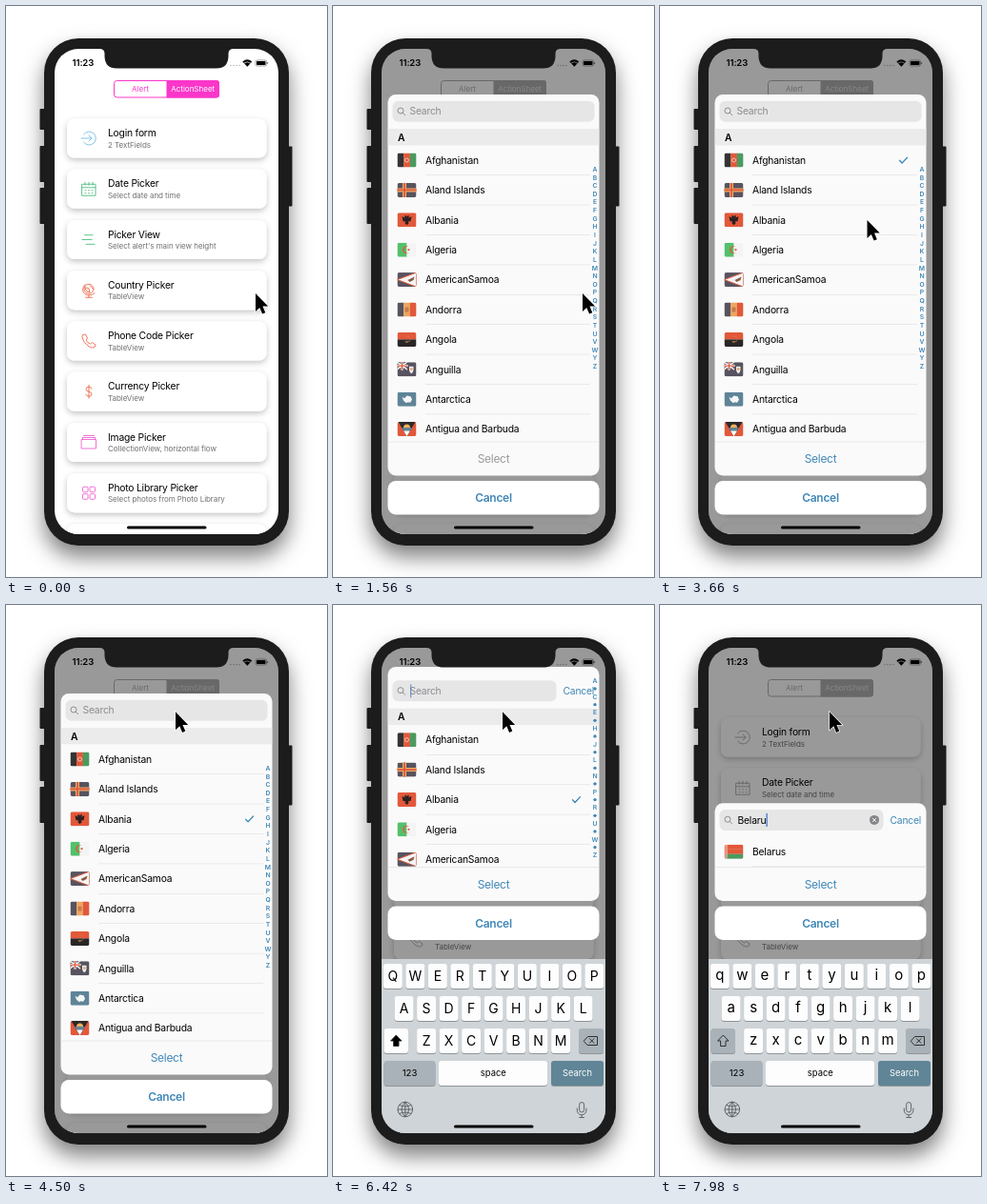
Recreate the animation shown at these times as an HTML page. Size 337 px wide and 600 px high, loop 8 s.

```html
<!DOCTYPE html>
<html lang="en">
<head>
<meta charset="utf-8">
<title>Country picker</title>
<style>
html, body { margin: 0; width: 100%; height: 100%; overflow: hidden; background: #fff; }
svg { display: block; }
#stage { width: 100vw; height: 100vh; }
text { font-family: Inter, "Liberation Sans", sans-serif; }
.body { font-size: 10.3px; letter-spacing: -.2px; }
.sub { font-size: 8px; letter-spacing: -.06px; fill: #707070; }
.big { font-size: 12px; letter-spacing: -.3px; text-anchor: middle; }
.mid { text-anchor: middle; }
.icon { fill: none; stroke-width: .9; stroke-linecap: round; stroke-linejoin: round; }
.seg { font-size: 8px; text-anchor: middle; }
.tintFill { fill: #fb36c9; }
.tintLine { stroke: #fb36c9; fill: none; }
.dimmed .icon { stroke: #a8a8a8; }
.dimmed .tintFill { fill: #adadad; }
.dimmed .tintLine { stroke: #adadad; }
.dimmed .onTint { fill: #dedede; }
</style>
</head>
<body>
<svg id="stage" viewBox="0 0 337 600">
  <defs>
    <clipPath id="screenClip"><rect x="51" y="45" width="235" height="510" rx="25"/></clipPath>
    <clipPath id="flagClip"><rect width="20" height="15" rx="2"/></clipPath>
    <filter id="phoneShadow" x="-30%" y="-20%" width="160%" height="140%">
      <feDropShadow dx="0" dy="12" stdDeviation="11" flood-opacity=".5"/>
    </filter>
    <filter id="cardShadow" x="-10%" y="-10%" width="120%" height="120%">
      <feDropShadow dx="0" dy="2.5" stdDeviation="3" flood-opacity=".24"/>
    </filter>
  </defs>
  <g fill="#1c1c1c">
    <rect x="40" y="34" width="257" height="533" rx="36" filter="url(#phoneShadow)"/>
    <rect x="35.5" y="108" width="6" height="22" rx="1"/>
    <rect x="35.5" y="147" width="6" height="38" rx="1"/>
    <rect x="35.5" y="191" width="6" height="38" rx="1"/>
    <rect x="296" y="147.500" width="4.500" height="63" rx="1"/>
  </g>
  <g clip-path="url(#screenClip)">
    <rect x="51" y="45" width="235" height="510" fill="#fff"/>
    <g id="app"></g>
    <rect id="dim" x="51" y="45" width="235" height="510"/>
    <g id="overlay"></g>
    <rect x="127" y="546.500" width="83.500" height="3" rx="1.500"/>
  </g>
  <path fill="#1c1c1c" d="M98 44V45Q103.500 45 103.500 50V53Q104 65.500 116 65.500H221Q233 65.500 233.500 53V50Q233.500 45 239 45V44Z"/>
  <path id="pointer" d="M0 0V18.900L4.300 14.900L7.100 21.600L10.300 20.300L7.500 13.600H13.200Z"
        stroke="#fff" stroke-width="1.300" paint-order="stroke"/>
</svg>
<script>
const LOOP = 8000, STEP = 60;
const BLUE = '#3f87b8', RED = '#e2583a', DARK = '#57535f', GREEN = '#4c9a60';
const ROW = 31.4, LEFT = 57.5, WIDTH = 222;
const el = id => document.getElementById(id);

const rect = (x, y, w, h, fill, rx = 0, more = '') =>
  `<rect x="${x}" y="${y}" width="${w}" height="${h}" rx="${rx}" fill="${fill}" ${more}/>`;
const circle = (x, y, r, fill, more = '') => `<circle cx="${x}" cy="${y}" r="${r}" fill="${fill}" ${more}/>`;
const path = (d, fill, more = '') => `<path d="${d}" fill="${fill}" ${more}/>`;
const line = (d, color, width = 1) =>
  `<path d="${d}" fill="none" stroke="${color}" stroke-width="${width}" stroke-linecap="round" stroke-linejoin="round"/>`;
const label = (x, y, str, cls = 'body', fill = '#000', more = '') =>
  `<text x="${x}" y="${y}" class="${cls}" fill="${fill}" ${more}>${str}</text>`;

const clamp = v => Math.max(0, Math.min(1, v));
const lerp = (a, b, p) => a + (b - a) * p;
const easeOut = p => 1 - (1 - p) ** 2.5;
const easeInOut = p => p * p * (3 - 2 * p);
const track = (t, keys) => {
  const i = keys.findIndex(k => k[0] > t);
  if (i === 0) return keys[0][1];
  if (i < 0) return keys[keys.length - 1][1];
  const [t0, a] = keys[i - 1], [t1, b] = keys[i];
  return lerp(a, b, (t - t0) / (t1 - t0));
};
const hold = (t, keys) => keys.reduce((value, k) => t >= k[0] ? k[1] : value, keys[0][1]);

// Flags, drawn in a 20 x 15 box
const cols = (...c) => c.map((f, i) => rect(20 * i / c.length, 0, 20 / c.length + .1, 15, f)).join('');
const bands = (...c) => c.map((f, i) => rect(0, 15 * i / c.length, 20, 15 / c.length + .1, f)).join('');
const jack = rect(0, 0, 10, 7.5, DARK) + line('M0 0L10 7.500M10 0L0 7.500', '#fff', 1.4) +
  line('M5 0V7.500M0 3.750H10', '#fff', 2.4) + line('M5 0V7.500M0 3.750H10', RED, 1.3);
const shield = path('M12.500 4.500H17V8.500Q16.500 11 14.750 12Q13 11 12.500 8.500Z', '#eee');
const FLAGS = {
  'Afghanistan': cols('#343434', RED, GREEN) + circle(10, 7.5, 2, 'none', 'stroke="#f4cfc2" stroke-width=".9"'),
  'Aland Islands': bands(DARK) + line('M7.500 0V15M0 7.500H20', '#e9ad6a', 4) + line('M7.500 0V15M0 7.500H20', RED, 1.8),
  'Albania': bands(RED) + path('M10 4L8.500 2.500L7.500 4L9 5.500L5 4L6 9L8.500 9L8 11L10 13L12 11L11.500 9L14 9L15 4L11 5.500L12.500 4L11.500 2.500Z', '#2c2020'),
  'Algeria': cols('#53c06b', '#f4f4f4') + path('M12.800 5A4 4 0 1 0 12.800 10A3.300 3.300 0 1 1 12.800 5Z', RED) + circle(12, 7.5, 1.1, RED),
  'AmericanSamoa': bands(DARK) + path('M20 0L0 7.500L20 15Z', '#f4f4f4', `stroke="${RED}" stroke-width="1"`) +
    path('M11 8L18 4.500L17 8L13 10Z', '#8a5a42'),
  'Andorra': cols(DARK, '#eba661', RED) + rect(8, 5, 4, 5, '#c67a50', 1),
  'Angola': bands(RED, '#2b2626') + path('M9 4.500A3.200 3.200 0 1 1 8 9.500L12 9.500A2.500 2.500 0 0 0 9 4.500Z', '#eeb15e'),
  'Anguilla': bands(DARK) + jack + shield + rect(13.4, 6, 2.7, 2.5, '#e9a35e', 1),
  'Antarctica': bands('#5f8497') + path('M5 5L7.500 6.500L10 3.700L14 4.500L15.500 8L13.500 11L11 10.500L9.500 11.500L6.500 9Z', '#f6f6f6'),
  'Antigua and Barbuda': bands(RED) + path('M1 0H19L10 15Z', '#2d2929') + path('M4.600 6H15.400L10 15Z', '#5f8497') +
    path('M6.700 9.500H13.300L10 15Z', '#fff') + path('M6.500 6A3.500 3.500 0 0 1 13.500 6Z', '#eeb15e'),
  'Bahamas': bands('#5f8497', '#eeb15e', '#5f8497') + path('M0 0L9 7.500L0 15Z', '#2d2929'),
  'Bahrain': bands(RED) + path('M0 0H6L9 1.500L6 3L9 4.500L6 6L9 7.500L6 9L9 10.500L6 12L9 13.500L6 15H0Z', '#f4f4f4'),
  'Bangladesh': bands(GREEN) + circle(9, 7.5, 4, RED),
  'Barbados': cols(DARK, '#eeb15e', DARK) + line('M10 4V11M8 5Q8 8 10 8Q12 8 12 5', '#2d2929', 1),
  'Belarus': bands(RED, RED, GREEN) + rect(0, 0, 3, 15, '#f3d8cf') + line('M1.500 1V14', RED, 1.1),
  'Belgium': cols('#1d1a1a', '#f39a78', '#ea5a38'),
  'Belize': bands(DARK) + rect(0, 0, 20, 1.8, RED) + rect(0, 13.2, 20, 1.8, RED) + circle(10, 7.5, 4.2, '#f0f0f0') + circle(10, 7.5, 2.3, '#839486'),
  'Benin': bands('#f39a78', RED) + rect(0, 0, 8, 15, GREEN),
  'Bermuda': bands(RED) + jack + shield + circle(14.75, 8, 1.3, RED)
};
const COUNTRIES = Object.keys(FLAGS);

// The app behind the sheet
const CARDS = [
  ['Login form', '2 TextFields', '#74bfe8', 'M-5.500 -4A7 7 0 1 1 -5.500 4M-8 0H3M0 -3L3 0L0 3'],
  ['Date Picker', 'Select date and time', '#50bd80', 'M-7 -5H7V7H-7ZM-7 -1.500H7M-4 -7V-4M4 -7V-4M0 -7V-4M-4 1.500H-3M-.5 1.500H.5M3 1.500H4M-4 4.500H-3M-.5 4.500H.5M3 4.500H4'],
  ['Picker View', "Select alert's main view height", '#50bd80', 'M-4.500 -4.800H4M-7 0H3M-3 4.800H6'],
  ['Country Picker', 'TableView', '#ee6a4c', 'M5 -1.500A5 5 0 1 1 -5 -1.500A5 5 0 1 1 5 -1.500M-4 -6Q-9 0 -4 4Q1 7 6 3M0 5.500V7.500M-3.500 7.500H3.500M-4 -3L0 -2L1 2L-2 1ZM1 -5L4 -2'],
  ['Phone Code Picker', 'TableView', '#ee6a4c', 'M-6 -6.500L-3.500 -7L-1.500 -3L-3 -1Q-1.500 2 1.500 3L3.500 1.500L7 4L6.500 6Q4 8.500 -1 5Q-6.500 1 -7 -4Z'],
  ['Currency Picker', 'TableView', '#ee6a4c', 'M3 -3Q2.500 -5 0 -5Q-3 -5 -3 -2.500Q-3 -.5 0 0Q3 .5 3 2.700Q3 5 0 5Q-2.500 5 -3 3M0 -7V7'],
  ['Image Picker', 'CollectionView, horizontal flow', '#ee63d0', 'M-7.500 -3H7.500V6.500H-7.500ZM-6.500 -5H6.500M-5.500 -7H5.500M-6.500 -5V-3M6.500 -5V-3'],
  ['Photo Library Picker', 'Select photos from Photo Library', '#ee63d0', [[-6.5, -6.5], [1, -6.5], [-6.5, 1], [1, 1]].map(([x, y]) => `M${x + 1.5} ${y}h3q1 0 1 1v3.500q0 1 -1 1h-3.500q-1 0 -1 -1v-3.500q0 -1 1 -1`).join('')]
];

function drawApp() {
  const cardY = i => 118.5 + 53.25 * i;
  const shapes = Array.from({ length: 9 }, (_, i) => rect(64, cardY(i), 209.5, 41, '#fff', 8)).join('');
  const content = CARDS.map(([title, sub, color, d], i) => {
    const y = cardY(i);
    return `<path class="icon" stroke="${color}" transform="translate(87 ${y + 20.5})" d="${d}"/>` +
      label(107, y + 18.5, title) + label(107, y + 30, sub, 'sub');
  }).join('');
  const status = label(69.5, 63.4, '11:23', '', '#000', 'font-size="9.6" font-weight="600" letter-spacing="-.1"') +
    [0, 1, 2, 3].map(i => circle(236 + 3 * i, 62.5, .8, '#b5b5b5')).join('') +
    path('M248.300 58.600Q253.300 54 258.300 58.600L253.300 63.800Z', '#000') +
    line('M250 59.900Q253.300 57.500 256.600 59.900', '#fff', .7) +
    rect(262, 57, 11.5, 6, 'none', 1.6, 'stroke="#777" stroke-width=".7"') +
    rect(263, 58, 9.5, 4, '#000', .8) + rect(274.2, 59, .9, 2, '#777');
  const segments = '<rect class="tintLine" x="113.500" y="78.500" width="110" height="17.500" rx="3"/>' +
    '<path class="tintFill" d="M168.500 78H221Q224 78 224 81V93.500Q224 96.500 221 96.500H168.500Z"/>' +
    label(141, 90.2, 'Alert', 'seg tintFill') + label(196.2, 90.2, 'ActionSheet', 'seg onTint', '#fff');
  el('app').innerHTML = `<g filter="url(#cardShadow)">${shapes}</g>` + content + status + segments;
}

function drawKeyboard(y, upper) {
  const key = (x, ky, w, fill) => rect(x, ky + .9, w, 26, '#8f9599', 3) + rect(x, ky, w, 26, fill, 3);
  const rows = ['qwertyuiop', 'asdfghjkl', 'zxcvbnm'].map((letters, r) =>
    [...letters].map((ch, i) => {
      const cx = 168.6 + (i - (letters.length - 1) / 2) * 23.5, ky = 5 + 34 * r;
      return key(cx - 10, ky, 20, '#fdfdfd') +
        label(cx, ky + (upper ? 18.2 : 17.4), upper ? ch.toUpperCase() : ch, 'mid', '#000', `font-size="${upper ? 14 : 15}"`);
    }).join('')).join('');
  const gray = '#a9b2b8';
  return `<g transform="translate(0 ${y})">` + rect(51, 0, 235, 190, '#ced4d7') + rows +
    key(53.5, 73, 25.5, upper ? '#fdfdfd' : gray) + key(258, 73, 26, gray) +
    path('M66.300 80L72 86H69V91.500H63.600V86H60.600Z', upper ? '#000' : 'none', 'stroke="#222" stroke-width=".9" stroke-linejoin="round"') +
    line('M263.500 86L267.500 81.500H277.500V90.500H267.500ZM269.500 83.700L274 88.300M274 83.700L269.500 88.300', '#222', .9) +
    key(53.5, 107, 54, gray) + key(111, 107, 114, '#fdfdfd') + key(229, 107, 55, '#5f8597') +
    label(80.5, 123.4, '123', 'mid', '#000', 'font-size="9.6"') +
    label(168.3, 123, 'space', 'mid', '#000', 'font-size="9.4"') +
    label(256.5, 123.2, 'Search', 'mid', '#fff', 'font-size="9.3"') +
    line('M68 158A7.800 7.800 0 1 1 83.600 158A7.800 7.800 0 1 1 68 158H83.600M75.800 150.200V165.800M75.800 150.200Q68 158 75.800 165.800Q83.600 158 75.800 150.200M69.800 153.500Q75.800 156.500 81.800 153.500M69.800 162.500Q75.800 159.500 81.800 162.500', '#555c60', .9) +
    line('M258.600 153A2.500 2.500 0 0 1 263.600 153V158.500A2.500 2.500 0 0 1 258.600 158.500ZM256.300 157V159A4.800 4.800 0 0 0 265.900 159V157M261.100 164V166.500M258.600 166.500H263.600', '#555c60', .9) + '</g>';
}

function drawIndex(top, bottom, condensed) {
  const letters = condensed ? [...'A•C•E•H•J•L•N•P•R•U•W•Z'] : [...'ABCDEFGHIJKLMNOPQRSTUVWYZ'];
  const stretch = condensed ? (bottom - top) / 218 : 1;
  const body = letters.map((ch, i) => {
    const y = (i - (letters.length - 1) / 2) * 8.63;
    return ch === '•' ? circle(0, y, 1.7, BLUE) : label(0, y + 2.5, ch, 'mid', BLUE, 'font-size="6.8" font-weight="600"');
  }).join('');
  return `<g transform="translate(275 ${(top + bottom) / 2 + (condensed ? 1 : -.5)}) scale(1 ${stretch})">${body}</g>`;
}

function drawSheet({ top, bottom, inset, query, checked, editing, caret, raised }) {
  const tableEnd = bottom - 35.5, origin = top + inset, fieldY = origin + 17.7;
  const names = query ? COUNTRIES.filter(n => n.startsWith(query)) : COUNTRIES.slice(0, 10);
  const first = origin + (query ? 51 : 69), lineEnd = query ? 279.5 : 270;
  const rows = names.map((name, i) => {
    const y = first + ROW * i;
    return `<g transform="translate(67.500 ${y - 7.5})" clip-path="url(#flagClip)">${FLAGS[name]}</g>` +
      label(97, y + 3.7, name) + rect(97, y + ROW / 2 - .3, lineEnd - 97, .6, '#dedede') +
      (i === checked ? line(`M${query ? 261 : 251.5} ${y + .3}l2.600 2.700l5.400 -5.800`, BLUE, 1.3) : '');
  }).join('');
  const header = query ? '' : rect(LEFT, origin + 36, WIDTH, 17.4, '#ebebeb') +
    label(68, origin + 48.8, 'A', 'body', '#000', 'font-weight="600"');
  const field = rect(62.5, fieldY - 11, editing ? 172 : 212, 22, '#e6e6e7', 6) +
    circle(71, fieldY - .7, 3, 'none', 'stroke="#858589" stroke-width=".9"') +
    line(`M73.200 ${fieldY + 1.500}l2.500 2.500`, '#858589', .9) +
    label(query ? 81.5 : 80.5, fieldY + 3.6, query || 'Search', 'body', query ? '#000' : '#8c8c90', 'id="query"') +
    (editing ? label(241.5, fieldY + 3.8, 'Cancel', 'body', BLUE) : '') +
    (query ? circle(225, fieldY, 5, '#858589') + line(`M223.200 ${fieldY - 1.8}l3.600 3.600m0 -3.600l-3.600 3.600`, '#fff', .9) : '') +
    `<rect id="caret" x="81" y="${fieldY - 7}" width="1.300" height="14" fill="#4477c4" opacity="${caret}"/>`;
  return `<clipPath id="tableClip"><rect x="${LEFT}" y="${top}" width="${WIDTH}" height="${tableEnd - top}"/></clipPath>` +
    rect(LEFT, top, WIDTH, bottom - top, '#fafafa', 8.5) +
    `<g clip-path="url(#tableClip)">${rows}${header}${field}${query ? '' : drawIndex(top, tableEnd, raised)}</g>` +
    rect(LEFT, tableEnd - .3, WIDTH, .6, '#dcdcdc') +
    label(168.5, bottom - 13.1, 'Select', 'big', checked < 0 ? '#9a9a9a' : BLUE) +
    rect(LEFT, bottom + 5.5, WIDTH, 35.5, '#fff', 8.5) +
    label(168.5, bottom + 27.6, 'Cancel', 'big', BLUE, 'font-weight="600"');
}

function pointerAt(t) {
  const moves = [[2100, 2820, 217.5, 170, easeOut], [3180, 3660, 217.5, 225, easeInOut], [3900, 4500, 178, 112.3, easeInOut]];
  let x = 262, y = 302;
  for (const [start, end, toX, toY, ease] of moves) {
    const p = ease(clamp((t - start) / (end - start)));
    x = lerp(x, toX, p);
    y = lerp(y, toY, p);
  }
  return [x, y];
}

function render(t) {
  const shown = hold(t, [[0, 0], [1140, .003], [1380, .7], [1560, 1]]);
  const lift = hold(t, [[0, 0], [5700, 66.5], [6000, 176], [6180, 181], [6240, 182.5]]);
  const query = hold(t, [[0, ''], [7080, 'B'], [7200, 'Be'], [7440, 'Bel'], [7620, 'Bela'], [7860, 'Belar'], [7980, 'Belaru']]);
  const checked = hold(t, [[0, -1], [3060, 0], [3840, 2]]);
  const caret = hold(t, [[0, 0], [6000, 1], [6420, .65], [6480, .3], [6540, 0], [6840, .5], [6900, 1]]);
  const filtered = t >= 7140;
  const top = filtered ? track(t, [[7140, 65.2], [7380, 82], [7560, 145], [7620, 145], [7800, 208.2]]) : 93 - .153 * lift;
  const inset = filtered ? track(t, [[7140, 7.5], [7380, 0]]) : .0415 * lift;

  el('app').setAttribute('class', shown > .01 ? 'dimmed' : '');
  el('dim').setAttribute('opacity', shown > .01 ? .4 * shown : 0);
  el('overlay').innerHTML = shown === 0 ? '' :
    `<g transform="translate(0 ${(1 - shown) * 462})">` +
    drawSheet({ top, bottom: 493.5 - lift, inset, query, checked, editing: t >= 6000, caret, raised: lift > 0 }) + '</g>' +
    (lift ? drawKeyboard(554.5 - lift, !query) : '');
  if (query) el('caret').setAttribute('x', 81.7 + el('query').getComputedTextLength());
  el('pointer').setAttribute('transform', `translate(${pointerAt(t)})`);
}

drawApp();
const start = performance.now();
let last = -1;
function tick() {
  const t = Math.floor((performance.now() - start) % LOOP / STEP) * STEP;
  if (t !== last) render(last = t);
  requestAnimationFrame(tick);
}
tick();
</script>
</body>
</html>
```
